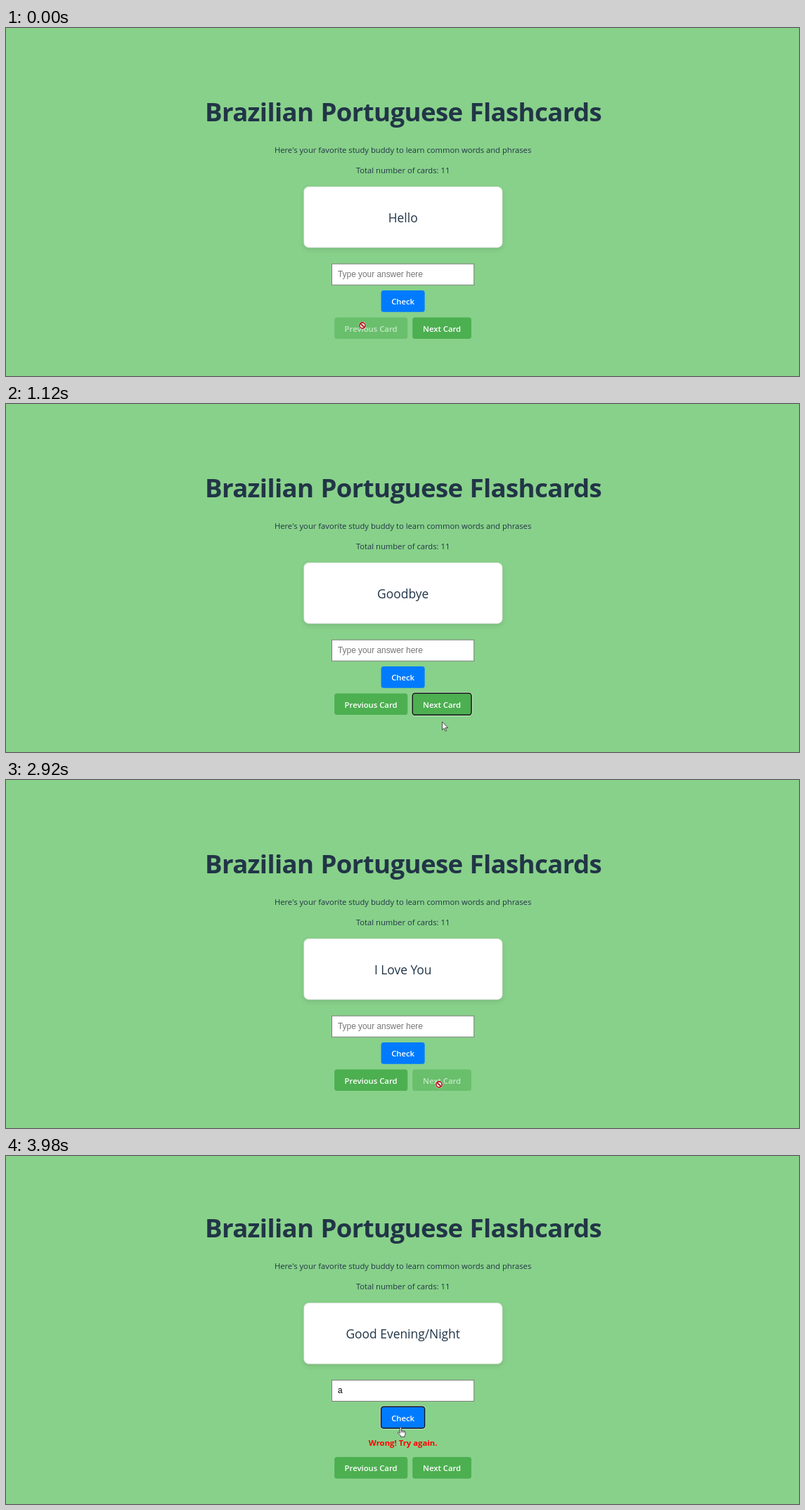
These frames come from a looping animation (1128x496 px, 4130 ms). An HTML page:

```html
<!DOCTYPE html>
<html lang="en">
<head>
<meta charset="utf-8">
<title>Flashcards</title>
<style>
  html, body { margin: 0; width: 100%; height: 100%; overflow: hidden; background: #88d18a; }
  svg { display: block; font-family: "Open Sans", "Noto Sans", sans-serif; fill: #213547; }
  text { white-space: pre; }
  .mid { text-anchor: middle; }
  .title { font-size: 36.6px; font-weight: 700; letter-spacing: -.62px; word-spacing: 1.2px; }
  .body { font-size: 11.22px; }
  .word { font-size: 17.4px; }
  .card { fill: #fff; stroke: #ddd; stroke-width: .7; filter: drop-shadow(0 3px 3px rgba(0, 0, 0, .1)); }
  .field { font: 11.88px "Liberation Sans", Arial, sans-serif; }
  .label { font-size: 11.3px; font-weight: 600; fill: #fff; }
  .note { font-size: 11.35px; font-weight: 700; }
</style>
</head>
<body>
<svg width="1128" height="496" viewBox="0 0 1128 496">
  <g id="top">
    <text class="mid title" x="565" y="133">Brazilian Portuguese Flashcards</text>
    <text class="mid body" x="564.6" y="177.5">Here's your favorite study buddy to learn common words and phrases</text>
    <text class="mid body" x="564.6" y="207">Total number of cards: 11</text>
    <rect class="card" x="423.8" y="226.3" width="282.2" height="86.6" rx="7"/>
    <rect id="mark" x="528" y="256" width="74" height="27" fill="#0078d7"/>
    <text id="word" class="mid word" x="564.7" y="276.5"></text>
    <rect x="463.5" y="336.2" width="202.2" height="30" fill="#fff" stroke="#767676" stroke-width=".9"/>
    <text id="field" class="field" x="472" y="355"></text>
    <rect id="caret" x="488.5" y="345" width="1" height="13" fill="#000"/>
    <g id="check">
      <rect x="533.6" y="374" width="62" height="30.7" rx="3.5" fill="#007bff"/>
      <text class="mid label" x="564.6" y="394.4">Check</text>
    </g>
  </g>
  <text id="note" class="note mid" y="413"></text>
  <g id="popper" transform="translate(582.6 402.8)">
    <path d="M.4 11.6 3.4 4.2 8 8.6Z" fill="#b89a55"/>
    <path d="M3.4 4.2 8 8.6Q9 7 7.2 5.2 5 3.2 3.4 4.2Z" fill="#655f78"/>
    <path d="M6 4.8Q7.8 3.4 6.6 .8M7 6Q8.8 4.6 11.4 6.4M6.8 5Q9.8 3.8 10 1.2" fill="none" stroke="#5a6fa8" stroke-width="1.2"/>
    <g fill="#b9587c"><circle cx="3.4" cy="1.8" r=".9"/><circle cx="10.9" cy="3.6" r=".9"/><circle cx="10" cy="9.2" r=".9"/></g>
  </g>
  <g id="row">
    <g id="prev">
      <rect x="467.2" y="412.4" width="104" height="30.7" rx="3.5" fill="#4caf50"/>
      <text class="mid label" x="519.1" y="432.6">Previous Card</text>
    </g>
    <g id="next">
      <rect x="578.2" y="412.4" width="83.7" height="30.7" rx="3.5" fill="#4caf50"/>
      <text class="mid label" x="620.1" y="432.6">Next Card</text>
    </g>
  </g>
  <g id="ring" fill="none">
    <rect class="r" stroke="#fff" stroke-width="1"/>
    <rect class="r" stroke="#101010" stroke-width="1.5"/>
  </g>
  <g id="cursor">
    <circle id="halo" r="9.2" fill="#ff0" fill-opacity=".5"/>
    <path id="hand" fill="#fff" stroke="#222" stroke-width=".8" stroke-linejoin="round"
      d="M-.9 9.2V1.2Q-.9 0 .2 0T1.3 1.2V5Q2.6 4.2 3.3 5.3 4.6 4.7 5.2 5.8 6.8 5.4 6.9 7V9.6Q6.9 11 6 12.2V13.8H.6V12.6L-3.6 8.4Q-4 7.1-2.8 6.9Q-1.9 7.2-.9 8.4M1.3 5V7.8M3.3 5.3V7.8M5.2 5.8V8"
      transform="translate(-.6 0)"/>
    <path id="arrow" fill="#fff" stroke="#222" stroke-width=".8"
      d="M0 0V11.6L2.7 9.1 4.5 13.4 6.2 12.7 4.4 8.5H8.2Z"/>
    <g id="no" fill="none">
      <circle r="4.1" fill="#fff" fill-opacity=".75" stroke="#fff" stroke-width="2.4"/>
      <path d="M-2.9-2.9 2.9 2.9" stroke="#b5121b" stroke-width="1.7"/>
      <circle r="4.1" stroke="#b5121b" stroke-width="1.6"/>
    </g>
  </g>
</svg>
<script>
const LOOP = 4130, SHIFT = 16.7;
const $ = id => document.getElementById(id);

// Each step lists only what differs from the step before: [ms, changes]
const steps = [
  [0, { word: 'Hello', text: '', note: '', focus: '', prev: 0, next: 1, mark: 0, cursor: 'no', x: 507, y: 424, halo: 0 }],
  [160, { halo: 1 }],
  [330, { halo: 0 }],
  [490, { text: 'ola', focus: 'input', cursor: '' }],
  [650, { focus: 'check', cursor: 'hand', x: 600, y: 427 }],
  [800, { note: 'Correct!' }],
  [960, { focus: 'next', x: 620.5, y: 455.5, halo: 1 }],
  [1120, { word: 'Goodbye', text: '', note: '', prev: 1, cursor: 'arrow', y: 453, halo: 0 }],
  [1270, { focus: '', cursor: 'hand', x: 618, y: 270.7, halo: 1 }],
  [1430, { word: 'Tchau', halo: 0 }],
  [1590, { halo: 1 }],
  [1750, { word: 'Goodbye', mark: 1, halo: 0 }],
  [1910, { focus: 'next', x: 616, y: 434, halo: 1 }],
  [2060, { word: 'Good Morning', mark: 0 }],
  [2220, { word: 'Good Afternoon', halo: 0 }],
  [2430, { halo: 1 }],
  [2600, { word: 'Good Evening/Night' }],
  [2760, { cursor: 'no' }],
  [2920, { word: 'I Love You', focus: '', next: 0, halo: 0 }],
  [3080, { halo: 1 }],
  [3340, { halo: 0 }],
  [3510, { text: 'eu te amo', note: 'Correct!', focus: 'prev', cursor: 'hand', x: 538, y: 438, halo: 1 }],
  [3680, { word: 'Good Evening/Night', text: '', note: '', next: 1 }],
  [3820, { text: 'a', focus: 'check', x: 561.7, y: 386.5 }],
  [3980, { note: 'Wrong! Try again.', halo: 0 }]
];
let last = {};
const states = steps.map(([at, change]) => last = { ...last, ...change, at });

// x, y, width, height and vertical direction when feedback is shown
const boxes = {
  input: [463, 335.8, 203, 30.9, -1],
  check: [533.6, 374, 62, 30.7, -1],
  prev: [467.2, 412.4, 104, 30.7, 1],
  next: [578.2, 412.4, 83.7, 30.7, 1]
};

const set = (el, attrs) => { for (const k in attrs) el.setAttribute(k, attrs[k]); };
const show = (id, on) => { $(id).style.display = on ? '' : 'none'; };

function drawRing(name, shift) {
  show('ring', name);
  if (!name) return;
  const [x, y, w, h, dir] = boxes[name];
  document.querySelectorAll('.r').forEach((el, i) => {
    const grow = i ? .1 : 1;
    set(el, { x: x - grow, y: y + dir * shift - grow, width: w + 2 * grow, height: h + 2 * grow, rx: name === 'input' ? 1 : 3.5 + grow });
  });
}

function draw(s) {
  const shift = s.note ? SHIFT : 0;
  const good = s.note === 'Correct!';
  set($('top'), { transform: `translate(0 ${-shift})` });
  set($('row'), { transform: `translate(0 ${shift})` });
  $('word').textContent = s.word;
  set($('word'), { fill: s.mark ? '#fff' : '#213547' });
  show('mark', s.mark);
  $('field').textContent = s.text || 'Type your answer here';
  set($('field'), { fill: s.text ? '#000' : '#757575' });
  show('caret', s.focus === 'input');
  $('note').textContent = s.note;
  set($('note'), { x: good ? 554.6 : 564.7, fill: good ? '#008000' : '#f00' });
  show('popper', good);
  for (const id of ['prev', 'next']) set($(id), { opacity: s[id] ? 1 : .5 });
  drawRing(s.focus, shift);
  set($('cursor'), { transform: `translate(${s.x} ${s.y})` });
  for (const id of ['hand', 'arrow', 'no']) show(id, s.cursor === id);
  show('halo', s.halo);
}

let shown;
const start = performance.now();
function tick() {
  const t = (performance.now() - start) % LOOP;
  const state = states.findLast(s => s.at <= t);
  if (state !== shown) draw(shown = state);
  requestAnimationFrame(tick);
}
tick();
</script>
</body>
</html>
```
